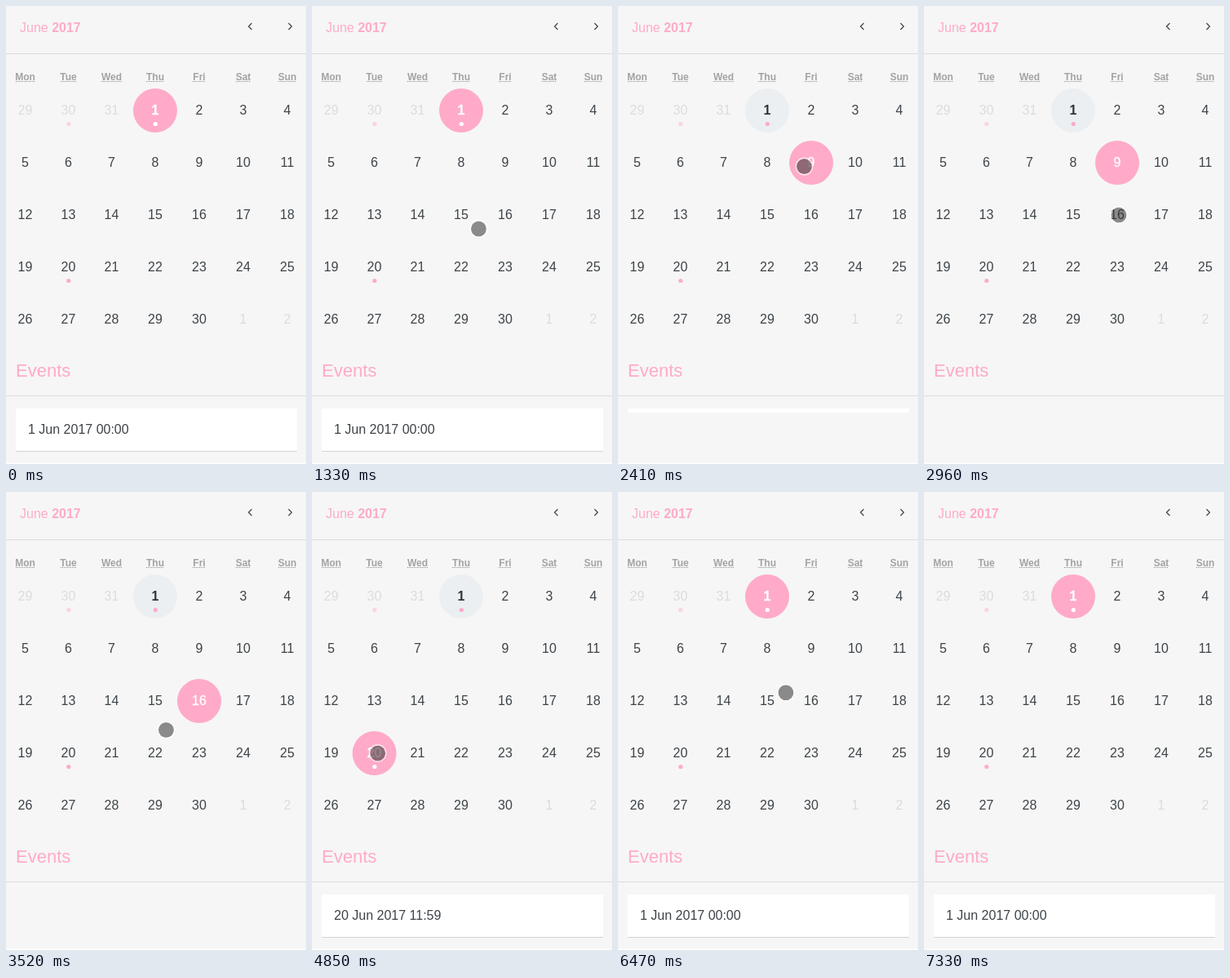
An HTML page for the animation above (8340 ms loop, 368x561 px).

```html
<!DOCTYPE html>
<html lang="en">
<head>
<meta charset="utf-8">
<title>Calendar</title>
<style>
  html, body { margin: 0; width: 100%; height: 100%; overflow: hidden; background: #fff; }
  svg { display: block; width: 368px; height: 561px; font: 16px "Liberation Sans", Arial, sans-serif; }
  .pink { fill: #ffaac8; }
  .rule { stroke: #dcdcdc; }
  .weekday { font-size: 12px; font-weight: bold; fill: #a3a3a3; text-anchor: middle; }
  .underline { stroke: #8c8c8c; stroke-dasharray: 1 1; }
  .arrow { fill: none; stroke: #444; stroke-width: 1.2; }
  .day text, #eventText { fill: #3d4348; }
  .day text { text-anchor: middle; }
  .day .disc { fill: none; }
  .day .dot { fill: #ffaac8; }
  .outside text { fill: #dcdcdc; }
  .outside .dot { opacity: .45; }
  .today text { font-weight: bold; fill: #2d3237; }
  .today .disc { fill: #ebeff2; }
  .selected .disc { fill: #ffaac8; }
  .selected text, .selected .dot { fill: #fff; }
  .selected text { stroke: #fff; stroke-width: .3; }
</style>
</head>
<body>
<svg viewBox="0 0 368 561">
  <rect width="368" height="559.5" fill="#f6f6f6"/>
  <text x="17" y="32" class="pink">June <tspan font-weight="bold">2017</tspan></text>
  <path class="arrow" d="M301.5 21L297.5 25L301.5 29M346.5 21L350.5 25L346.5 29"/>
  <path class="rule" d="M0 58.5H368M0 477.5H368"/>
  <g id="grid"></g>
  <text x="12" y="454" class="pink" font-size="22">Events</text>
  <clipPath id="cardClip"><rect id="cardArea" x="12" y="493" width="345" height="53"/></clipPath>
  <g clip-path="url(#cardClip)">
    <rect x="12" y="493" width="345" height="53" fill="#fff"/>
    <path d="M12 545.5H357" stroke="#d3d3d3"/>
    <text id="eventText" x="27" y="524"></text>
  </g>
  <g id="cursor">
    <circle r="9.5" fill="#323232" fill-opacity=".55"/>
    <circle r="10.2" fill="none" stroke="#fff" stroke-width="1.4" stroke-opacity=".7"/>
  </g>
</svg>
<script>
const LOOP = 8340, START = 920, TICK = 78, TICKS = 82, CARD_HEIGHT = 53;
const EVENTS = { 1: '1 Jun 2017 00:00', 20: '20 Jun 2017 11:59' };
const CLICKS = [[0, 1], [2250, 9], [3130, 16], [4300, 20], [5770, 1]];

const linear = p => p;
const easeOut = p => 1 - (1 - p) ** 2;
const smooth = p => p ** 3 * (p * (6 * p - 15) + 10);

// Cursor strokes in ticks; each bends towards a control point and starts where the last one ended.
const ENTRY = [280, 513];
const STROKES = [
  { from: 0, to: 10, bend: [185, 308], end: [209, 223], ease: easeOut },
  { from: 10, to: 13, bend: [217, 207], end: [228.5, 196.5], ease: easeOut },
  { from: 19, to: 26, bend: [232, 225], end: [239, 256], ease: smooth },
  { from: 31, to: 38, bend: [167, 330], end: [78, 322], ease: linear },
  { from: 49, to: 59, bend: [230, 200], end: [193, 129.5], ease: smooth },
  { from: 65, to: 76, bend: [190, 230], end: [235, 327], ease: smooth },
  { from: 76, to: 81, bend: [238, 440], end: [257, 533], ease: easeOut }
];

const byId = id => document.getElementById(id);
const grid = byId('grid'), cursor = byId('cursor');
const cardArea = byId('cardArea'), eventText = byId('eventText');

// Whole-pixel columns: the right half of the week is one pixel wider per day.
const columnX = i => 23.5 + 53 * i + Math.max(0, i - 2.5);

function add(parent, tag, attrs, text = '') {
  const node = document.createElementNS('http://www.w3.org/2000/svg', tag);
  for (const name in attrs) node.setAttribute(name, attrs[name]);
  node.textContent = text;
  return parent.appendChild(node);
}

['Mon', 'Tue', 'Wed', 'Thu', 'Fri', 'Sat', 'Sun'].forEach((name, i) => {
  const x = columnX(i);
  const label = add(grid, 'text', { x, y: 91, class: 'weekday' }, name);
  const half = Math.round(label.getComputedTextLength() / 2);
  add(grid, 'path', { class: 'underline', d: `M${Math.round(x) - half} 92.5h${half * 2}` });
});

const days = {};
for (let i = 0; i < 35; i++) {
  const number = i - 2;
  const label = (number + 30) % 31 + 1 - (number > 30 ? 30 : 0);
  const x = columnX(i % 7), y = 128 + 64 * Math.floor(i / 7);
  const day = add(grid, 'g', { class: 'day' });
  day.classList.toggle('outside', number < 1 || number > 30);
  day.classList.toggle('today', number === 1);
  add(day, 'circle', { class: 'disc', cx: x, cy: y, r: 27 });
  add(day, 'text', { x, y: y + 5 }, number > 30 ? number - 30 : label);
  if ([-1, 1, 20].includes(number)) add(day, 'circle', { class: 'dot', cx: x + .3, cy: y + 16.5, r: 2.6 });
  days[number] = day;
}

function cursorAt(tick) {
  const index = STROKES.findLastIndex(stroke => stroke.from <= tick);
  const { from, to, bend, end, ease } = STROKES[index];
  const start = index ? STROKES[index - 1].end : ENTRY;
  const u = ease(Math.min(1, (tick - from) / (to - from))), v = 1 - u;
  return start.map((value, axis) => v * v * value + 2 * u * v * bend[axis] + u * u * end[axis]);
}

function draw(time) {
  const tick = Math.floor((time - START) / TICK);
  const [clickedAt, selected] = CLICKS.findLast(([at]) => at <= time);
  for (const number in days) days[number].classList.toggle('selected', +number === selected);

  // The card collapses after an empty day is picked.
  const ticksSinceClick = Math.floor((time - clickedAt) / TICK) + 1;
  const collapsed = selected === 9 ? Math.max(0, CARD_HEIGHT - 16 * ticksSinceClick) : 0;
  cardArea.setAttribute('height', EVENTS[selected] ? CARD_HEIGHT : collapsed);
  eventText.textContent = EVENTS[selected] || EVENTS[1];

  const visible = tick >= 0 && tick < TICKS;
  cursor.setAttribute('visibility', visible ? 'visible' : 'hidden');
  if (visible) cursor.setAttribute('transform', `translate(${cursorAt(tick)})`);
}

const origin = performance.now();
function play() {
  draw((performance.now() - origin) % LOOP);
  requestAnimationFrame(play);
}
play();
</script>
</body>
</html>
```
